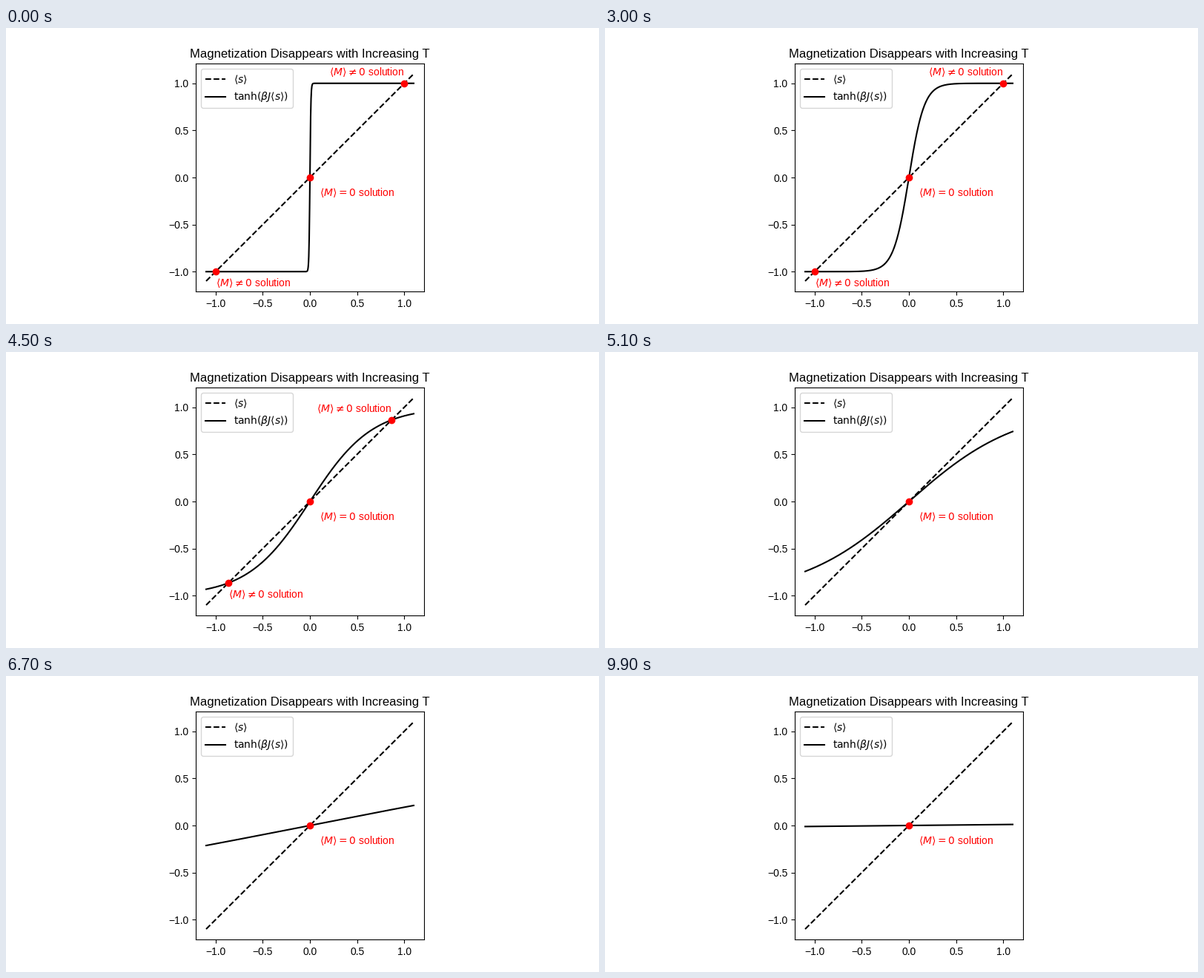
These frames come from a looping animation (800x400 px, 10 s). A matplotlib script:

```python
import numpy as np
import matplotlib.pyplot as plt
from matplotlib.animation import FuncAnimation

plt.rcParams["font.family"] = "Liberation Sans"
plt.rcParams["mathtext.fontset"] = "dejavusans"

FRAMES = 100
BETAS = np.logspace(2, -2, FRAMES)
S = np.linspace(-1.1, 1.1, 1000)
NONZERO = r"$\langle M \rangle \neq 0$ solution"
ZERO = r"$\langle M \rangle = 0$ solution"


def magnetization(beta):
    """Positive root of m = tanh(beta * m), or 0 above the critical point."""
    if beta <= 1:
        return 0.0
    m = 1.0
    for _ in range(1000):
        m = np.tanh(beta * m)
    return m


fig, ax = plt.subplots(figsize=(8, 4), dpi=100)
ax.set_aspect("equal")
ax.set(xlim=(-1.21, 1.21), ylim=(-1.21, 1.21))
ticks = np.arange(-1, 1.1, 0.5)
ax.set_xticks(ticks)
ax.set_yticks(ticks)
ax.set_title("Magnetization Disappears with Increasing T")

ax.plot(S, S, "k--", label=r"$\langle s \rangle$")
curve, = ax.plot(S, S, "k-", label=r"$\tanh(\beta J \langle s \rangle)$")
ax.legend(loc="upper left")

ax.plot(0, 0, "ro")
ax.text(0.1, -0.2, ZERO, color="red")
dots, = ax.plot([], [], "ro")
upper = ax.text(1, 1.083, NONZERO, color="red", ha="right")
lower = ax.text(-1, -1.152, NONZERO, color="red")


def update(i):
    beta = BETAS[i]
    m = magnetization(beta)
    curve.set_ydata(np.tanh(beta * S))
    dots.set_data([-m, m], [-m, m])
    upper.set_position((m, m + 0.083))
    lower.set_position((-m, -m - 0.152))
    for artist in (dots, upper, lower):
        artist.set_visible(m > 0)
    return curve, dots, upper, lower


anim = FuncAnimation(fig, update, frames=FRAMES, interval=100,
                     repeat=True, repeat_delay=0)
plt.show()
```
